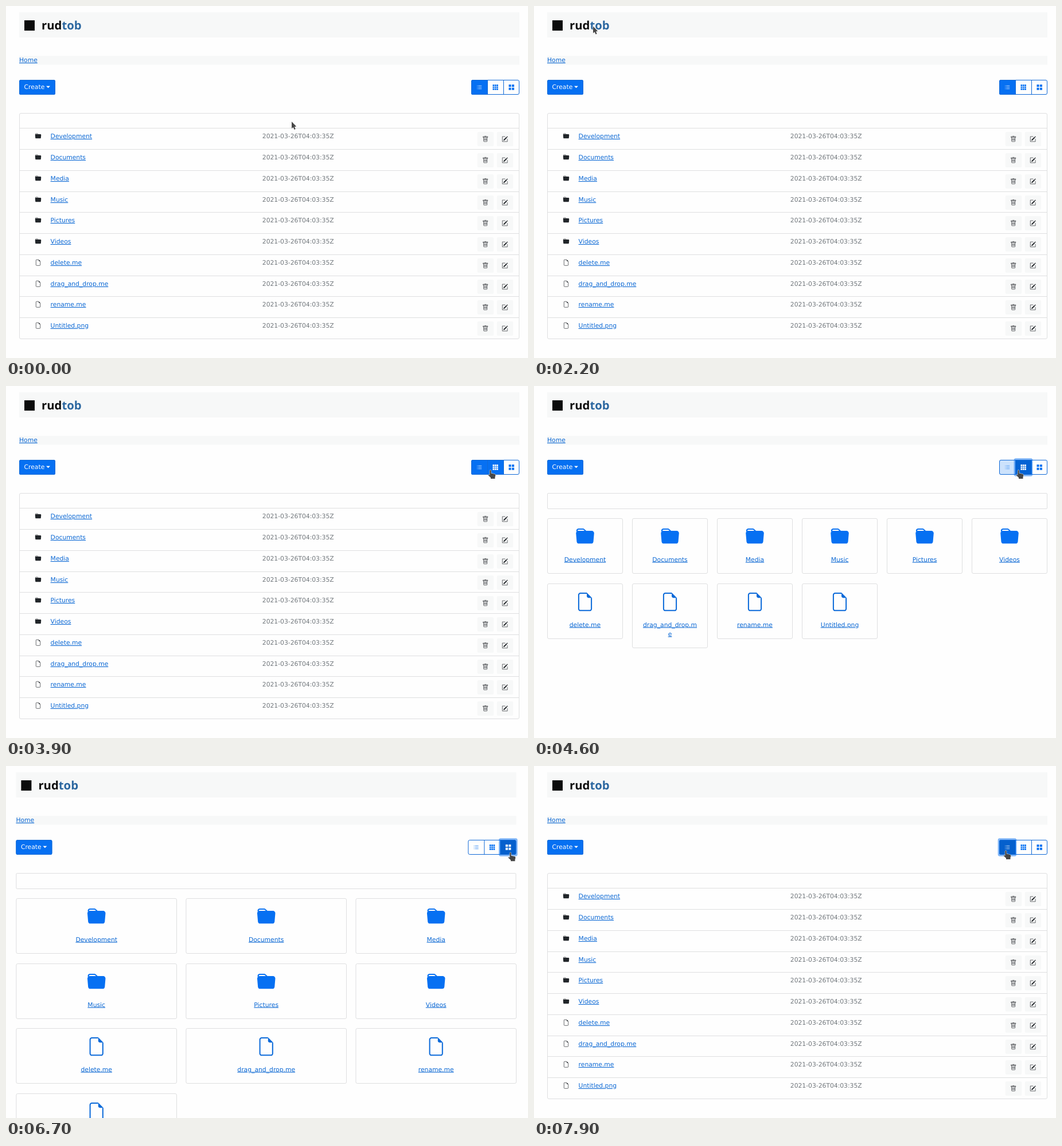
Write an HTML page that moves like this. It is 910 px wide and 615 px high and loops after 8 s.

```html
<!DOCTYPE html>
<html lang="en">
<head>
<meta charset="utf-8">
<title>File browser</title>
<style>
html, body { margin: 0; width: 100%; height: 100%; overflow: hidden; background: #fefefe; }
svg { display: block; width: 910px; height: 615px; }
text { font: 10.77px "DejaVu Sans", sans-serif; text-rendering: geometricPrecision; fill: #fefefe; }
.link { fill: #0b68d4; text-decoration: underline; }
.date { fill: #70767b; }
.brand { font: 900 20.3px "Noto Sans", sans-serif; fill: #0b0b0b; }
.box { fill: none; stroke: #dedfe0; }
.pale { fill: #f7f8f8; }
.edge { fill: none; stroke: #1069d6; }
.mid { text-anchor: middle; }
#cursor { fill: #474747; stroke: #fefefe; paint-order: stroke; }
</style>
</head>
<body>
<svg id="stage" viewBox="0 0 910 615"></svg>
<script>
const BLUE = [6, 112, 242], DARK = [5, 96, 205], WHITE = [254, 254, 254];
const INK = '#212529', LINK = '#0b6ad9', EM = 10.77;
const names = ['Development', 'Documents', 'Media', 'Music', 'Pictures', 'Videos',
  'delete.me', 'drag_and_drop.me', 'rename.me', 'Untitled.png'];

// Icons on a 16 unit grid: stroked path, filled path
const tiles = (spots, s) =>
  spots.map(y => spots.map(x => `M${x} ${y}h${s}v${s}h-${s}z`).join('')).join('');
const icons = {
  folder: ['M1 3.6V2.9A1.5 1.5 0 0 1 2.5 1.5H6.2a1.5 1.5 0 0 1 1 .4L8.8 3.4',
    'M.2 5.2A2 2 0 0 1 2.2 3H13.8a2 2 0 0 1 2 2.2l-.6 7a2 2 0 0 1-2 1.8H2.8a2 2 0 0 1-2-1.8z'],
  file: ['M9.5.5H4A1.5 1.5 0 0 0 2.5 2v12A1.5 1.5 0 0 0 4 15.5h8a1.5 1.5 0 0 0 1.5-1.5V4.5',
    'M9.5 0 14 4.5h-3A1.5 1.5 0 0 1 9.5 3z'],
  trash: ['M2 1.5h12v2H2zM3.5 4v9.5q0 1 1.5 1h6q1.5 0 1.5-1V4M6.5 1V.5h3V1M5.5 6v6M8 6v6M10.5 6v6', ''],
  edit: ['M9 1.5H1.5v13h13v-7', 'M4 12.2l1-3 6.8-6.8 2 2L7 11.2zM12.5 1.7 13.9.4l1.900 1.900-1.300 1.400z'],
  list: ['M5 4h9M5 8h9M5 12h9M2 4h1.5M2 8h1.5M2 12h1.5', ''],
  small: ['', tiles([1, 6, 11], 4)],
  large: ['', tiles([1, 9], 6)]
};

function icon(kind, cx, cy, size, color) {
  const [line, fill] = icons[kind];
  return `<g transform="translate(${cx - size / 2} ${cy - size / 2}) scale(${size / 16})">
    <path d="${line}" fill="none" stroke="${color}"/><path d="${fill}" fill="${color}"/></g>`;
}
const rect = (x, y, w, h, attrs, r = 2.5) =>
  `<rect x="${x}" y="${y}" width="${w}" height="${h}" rx="${r}" ${attrs}/>`;
const text = (x, y, str, cls = '') => `<text x="${x}" y="${y}" class="${cls}">${str}</text>`;
const kindOf = i => i < 6 ? 'folder' : 'file';

function listView() {
  let out = rect(23.5, 187.5, 871, 394, 'class="box"');
  names.forEach((name, i) => {
    const y = Math.floor(213.9 + 36.75 * i);
    out += `<path class="box" d="M23 ${y + .5}H895"/>`
      + icon(kindOf(i), 56, y + 14.3, EM, INK)
      + text(77.6, y + 18, name, 'link')
      + text(446.8, y + 18, '2021-03-26T04:03:35Z', 'date');
    ['trash', 'edit'].forEach((kind, n) => {
      const x = 835.7 + 34 * n;
      out += rect(x - 14, y + 7, 28.5, 25, 'class="pale"') + icon(kind, x, y + 19.5, EM, INK);
    });
  });
  return out;
}

function gridView(cols, pitch, width) {
  let out = rect(23.5, 187.5, 871, 27, 'class="box"', 1.5);
  names.forEach((name, i) => {
    const x = 23.5 + pitch * (i % cols), y = Math.round(231 + 113.6 * Math.floor(i / cols));
    const wraps = cols > 3 && name.length > 15, cx = x + width / 2;
    const lines = wraps ? [name.slice(0, 15), name.slice(15)] : [name];
    out += rect(x, y + .5, width, wraps ? 112 : 96, 'class="box"')
      + icon(kindOf(i), cx, y + 32.2, 3 * EM, i < 6 ? `rgb(${BLUE})` : LINK)
      + lines.map((s, n) => text(cx, y + 75.5 + 16 * n, s, 'link mid')).join('');
  });
  return out;
}

const shell = rect(23, 11, 872, 44, 'class="pale"', 0)
  + rect(32, 25, 18, 18, 'fill="#0b0b0b"', 0)
  + text(62, 41, 'rud<tspan fill="#2b67a0">tob</tspan>', 'brand')
  + rect(23, 87, 872, 15.5, 'class="pale"', 0)
  + text(23, 98, 'Home', 'link')
  + rect(23, 129, 63, 26, `fill="rgb(${BLUE})"`) + rect(23.5, 129.5, 62, 25, 'class="edge"')
  + text(31.5, 145, 'Create')
  + '<path d="M70 139.8h7l-3.5 3.5z" fill="#fefefe"/>';

const stage = document.getElementById('stage');
stage.innerHTML = `<clipPath id="round">${rect(811, 129, 84, 26, '')}</clipPath>
  <g id="page">${shell}<g class="view">${listView()}</g>
  <g class="view">${gridView(6, 148, 131)}</g><g class="view">${gridView(3, 296, 279.6)}</g>
  <g id="switch"></g></g><path id="cursor"/>`;
const page = document.getElementById('page'), group = document.getElementById('switch');
const cursor = document.getElementById('cursor'), views = document.querySelectorAll('.view');

const ARROW = 'M0 0V12L2.7 9.7 4.6 14 6.7 13.1 4.9 8.9 8.2 8.5z';
const HAND = 'M-1.2 1a1.2 1.2 0 0 1 2.4 0v4.5l6 1.3q2 .5 1.7 2.5l-.9 3v2.7h-7.5v-2l-4.5-4.2q.6-1.7 2.8-.1z';

const mix = (a, b, u) => a.map((v, i) => v + (b[i] - v) * u);
function ease(t, from, to) {
  const u = Math.min(1, Math.max(0, (t - from) / (to - from)));
  return u * u * (3 - 2 * u);
}

// Two clockwise laps, the second one tighter
function orbit(t) {
  const a = -.6 + 5.2 * (t - 400) / 900;
  const [cx, cy, rx, ry] = t < 1350 ? [358, 316, 280, 238] : [245, 250, 147, 150];
  return [cx + rx * Math.cos(a), cy + ry * Math.sin(a)];
}

// Moves after the laps: start, end, x, y, downward bow
const moves = [
  [1900, 2200, 103, 35.5, 0],
  [2200, 2300, 163.5, 104, 0],
  [2400, 3200, 830, 152, 55],
  [3300, 3900, 844.5, 147, 0],
  [5200, 5700, 886, 150, 5],
  [6550, 7300, 822.5, 148, 4]
];
function pointer(t) {
  let p = mix([498, 202], orbit(t), ease(t, 400, 650));
  for (const [from, to, x, y, bow] of moves) {
    const u = ease(t, from, to);
    p = mix(p, [x, y], u);
    p[1] += bow * 4 * u * (1 - u);
  }
  return p;
}

// A press focuses a button at once and selects it a little later
const kinds = ['list', 'small', 'large'];
const presses = [{ time: 4395, button: 1 }, { time: 5950, button: 2 }, { time: 7450, button: 0 }];
const focused = t => presses.reduce((b, p) => t >= p.time ? p.button : b, -1);
const selected = t => Math.max(0, focused(t - 90));
const shift = t => selected(t) === 2 ? -5.6 : 0; // room taken by the scrollbar

function hovered(t) {
  const [x, y] = pointer(t);
  return y >= 129 && y <= 155 ? Math.floor((x - shift(t) - 811) / 28) : -1;
}

// Share of the last 150 ms in which a state held: a linear transition
function fade(state, t) {
  let held = 0;
  for (let k = 0; k < 15; k++) held += state(t - 5 - 10 * k);
  return held / 15;
}

function drawSwitch(t) {
  let fills = '', rings = '';
  kinds.forEach((kind, i) => {
    const x = 811 + 28 * i;
    const blue = fade(s => selected(s) === i || hovered(s) === i, t);
    const dark = fade(s => selected(s) === i && focused(s) === i && hovered(s) === i, t);
    const ring = fade(s => focused(s) === i, t);
    fills += rect(x, 129, 28, 26, `fill="rgb(${mix(WHITE, mix(BLUE, DARK, dark), blue)})"`, 0)
      + icon(kind, x + 14.2, 142, EM, `rgb(${mix(BLUE, WHITE, blue)})`);
    rings += rect(x - 1, 127.7, 30, 28.6,
      `fill="none" stroke="rgb(${BLUE})" stroke-opacity="${ring / 2}" stroke-width="2.7"`, 2);
  });
  group.innerHTML = `<g clip-path="url(#round)">${fills}</g>`
    + rect(811.5, 129.5, 83, 25, 'class="edge"')
    + '<path class="edge" d="M839.5 129v26M867.5 129v26"/>' + rings;
}

function draw(t) {
  views.forEach((v, i) => v.style.display = i === selected(t) ? '' : 'none');
  page.setAttribute('transform', `translate(${shift(t)} 0)`);
  drawSwitch(t);
  cursor.setAttribute('d', kinds[hovered(t)] ? HAND : ARROW);
  cursor.setAttribute('transform', `translate(${pointer(t)})`);
}

const start = performance.now();
function loop() {
  const t = (performance.now() - start) % 8000;
  draw(Math.floor(t / 100) * 100); // the screen ticks every 100 ms
  requestAnimationFrame(loop);
}
loop();
</script>
</body>
</html>
```
